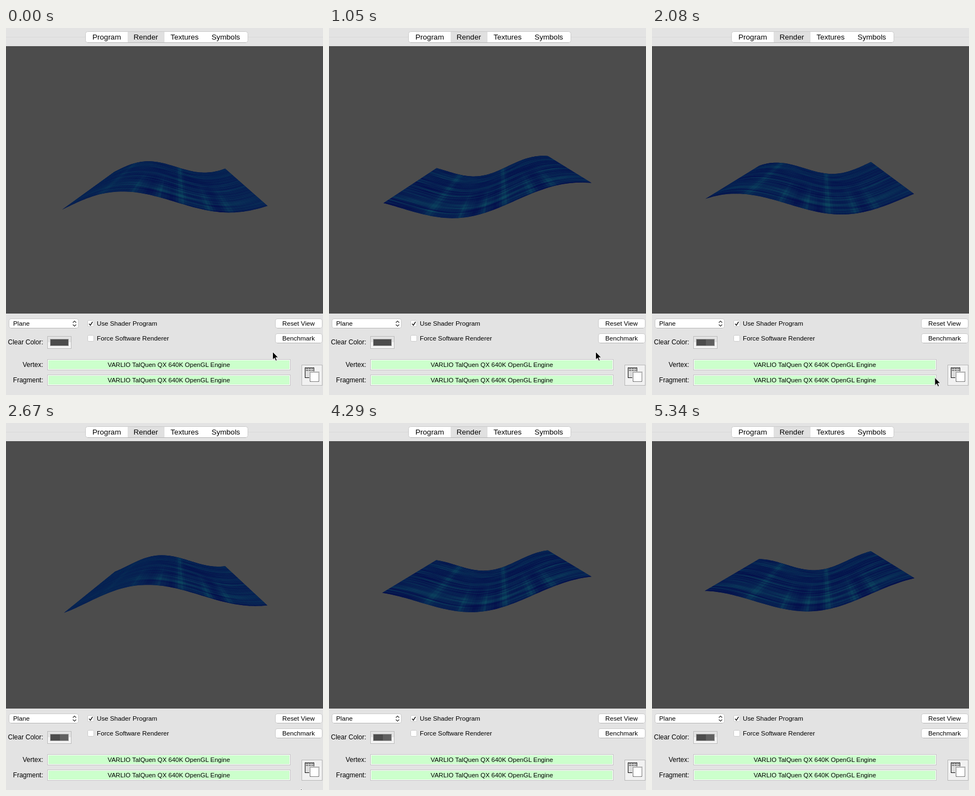
These frames come from a looping animation (576 px wide and 667 px high, 5.44 s). An HTML page with a canvas:

```html
<!DOCTYPE html>
<html lang="en">
<head>
<meta charset="utf-8">
<title>Shader preview</title>
<style>
  html, body { margin: 0; width: 576px; height: 667px; overflow: hidden; background: #e3e3e3; }
  svg, canvas { position: absolute; left: 0; top: 0; display: block; }
  text { font-family: "Liberation Sans", Arial, sans-serif; font-size: 11.7px; fill: #000; }
  .tab { font-size: 13.5px; text-anchor: middle; }
  .mid { text-anchor: middle; }
  .end { font-size: 12px; text-anchor: end; }
  .gpu { font-size: 11.5px; text-anchor: middle; }
  .btn { fill: #fff; stroke: #cbcbcb; }
  .edge { fill: none; stroke: #b6b6b6; }
</style>
</head>
<body>
<svg width="576" height="667" viewBox="0 0 576 667">
  <rect width="576" height="667" fill="#e3e3e3"/>
  <path d="M0 16.5H576" stroke="#dadada"/>
  <rect y="33" width="576" height="486" fill="#4c4c4c"/>

  <rect class="btn" x="144.5" y="6.5" width="295" height="20" rx="4"/>
  <rect x="221" y="7" width="67" height="19" fill="#e0e0e0"/>
  <path class="edge" d="M148 26.500H436"/>
  <text class="tab" x="183" y="21">Program</text>
  <text class="tab" x="254" y="21">Render</text>
  <text class="tab" x="324.5" y="21">Textures</text>
  <text class="tab" x="399.5" y="21">Symbols</text>

  <rect class="btn" x="5.5" y="528.5" width="126" height="17" rx="3.5"/>
  <path class="edge" d="M9 545.500H128"/>
  <text x="13" y="541">Plane</text>
  <path d="M121.500 535.500l3-3 3 3M121.500 539l3 3 3-3" fill="none" stroke="#333" stroke-width="1.200"/>

  <rect class="btn" x="148.5" y="531.5" width="11" height="11" rx="2"/>
  <path d="M151 537.500l2.300 2.700 4-6.200" fill="none" stroke="#222" stroke-width="1.500"/>
  <text x="165" y="541">Use Shader Program</text>
  <rect class="btn" x="148.5" y="558.5" width="11" height="11" rx="2"/>
  <text x="165" y="568">Force Software Renderer</text>

  <rect class="btn" x="489.5" y="528.5" width="85" height="17" rx="3.5"/>
  <text class="mid" x="531.5" y="541">Reset View</text>
  <rect class="btn" x="489.5" y="555.5" width="85" height="17" rx="3.5"/>
  <text class="mid" x="531.5" y="568">Benchmark</text>
  <path class="edge" d="M493 545.500H571M493 572.500H571"/>

  <text class="end" x="67.5" y="575">Clear Color:</text>
  <rect x="75.5" y="560.5" width="43" height="22" fill="#f4f4f4" stroke="#bcbcbc"/>
  <rect x="76" y="561" width="42" height="10" fill="#e3e3e3"/>
  <rect x="80.5" y="565.5" width="33" height="12" fill="#4c4c4c" stroke="#a0a0a0"/>
  <rect id="tint" x="98" y="566" width="15" height="11" fill="#606060"/>

  <text class="end" x="67.5" y="616">Vertex:</text>
  <text class="end" x="67.5" y="644">Fragment:</text>
  <g fill="none" stroke="#c4c4c4">
    <rect x="75.5" y="602.5" width="441" height="19"/>
    <rect x="75.5" y="630.5" width="441" height="19"/>
  </g>
  <g fill="#ccffcc" stroke="#fff">
    <rect x="76.5" y="603.5" width="439" height="17"/>
    <rect x="76.5" y="631.5" width="439" height="17"/>
  </g>
  <text class="gpu" x="296" y="616">VARLIO TalQuen QX 640K OpenGL Engine</text>
  <text class="gpu" x="296" y="644">VARLIO TalQuen QX 640K OpenGL Engine</text>

  <g shape-rendering="crispEdges">
    <rect x="537.5" y="612.5" width="37" height="37" fill="#f1f1f1" stroke="#b8b8b8"/>
    <rect x="543.5" y="617.5" width="16" height="18" fill="#dcdcdc" stroke="#111"/>
    <path d="M545 619.500h13M545 622.500h13" stroke="#333" stroke-dasharray="4 1"/>
    <rect x="551" y="624" width="19" height="20" fill="#e6e6e6"/>
    <rect x="552.5" y="625.5" width="16" height="17" fill="#fff" stroke="#111" stroke-dasharray="1 1" stroke-dashoffset=".5"/>
  </g>

  <path id="cursor" d="M0 0V16L3.700 12.600 6.200 18.300 8.700 17.200 6.300 11.600H11.300Z" fill="#000" stroke="#fff"/>
</svg>
<canvas id="view" width="576" height="519"></canvas>
<script>
const ctx = document.getElementById('view').getContext('2d');
const cursor = document.getElementById('cursor');
const tint = document.getElementById('tint');

// Step timing: 150 ms each, a few steps last 140 ms
const LOOP = 5440, STEPS = 37, SHORT = [9, 13, 15, 18, 20, 26];
const starts = [0];
for (let i = 0; i < STEPS - 1; i++) starts.push(starts[i] + (SHORT.includes(i) ? 140 : 150));

// Resting plane corners: front left, front right, back right, back left
const [A, B, C, D] = [[101.5, 329], [476, 306], [398, 246], [196.7, 260.8]];
const VANISH = [420, 1650], LIFT = -0.0182, K = 5.6;
const ROWS = 60, COLS = 72;

const d1 = [B[0] - C[0], B[1] - C[1]];
const d2 = [D[0] - C[0], D[1] - C[1]];
const sum = [0, 1].map(n => A[n] - B[n] + C[n] - D[n]);
const den = d1[0] * d2[1] - d2[0] * d1[1];
const G = (sum[0] * d2[1] - d2[0] * sum[1]) / den;
const H = (d1[0] * sum[1] - sum[0] * d1[1]) / den;

function project(u, v, phase) {
  const lift = LIFT * Math.cos(K * u - phase);
  const w = 1 + G * u + H * v + lift;
  return [0, 1].map(n =>
    (A[n] + u * (B[n] * (1 + G) - A[n]) + v * (D[n] * (1 + H) - A[n]) + lift * VANISH[n]) / w);
}

const clamp = (x, lo, hi) => Math.max(lo, Math.min(hi, x));

function rnd(a, b) {
  const s = Math.sin(a * 127.1 + b * 311.7) * 43758.5453;
  return s - Math.floor(s);
}

function noise(x, row) {
  const i = Math.floor(x), f = x - i;
  return rnd(i, row) * (1 - f) + rnd(i + 1, row) * f;
}

const bump = (u, at, width) => Math.exp(-(((u - at) / width) ** 2));

// Grain of the water: -1 is dark, +1 is teal
function grain(u, v, row) {
  const front = clamp(1.1 - 2 * v, 0, 1);
  const thread = noise(u * 9, row) * 1.1 + rnd(row, 77) * 1.1 - 1.35;
  const streaks = 0.6 * bump(u, 0.21, 0.022) + 0.75 * bump(u, 0.6, 0.018) +
    front * (0.7 * bump(u, 0.37, 0.015) + 0.65 * bump(u, 0.49, 0.012) +
      0.8 * bump(u, 0.73, 0.018) + 0.7 * bump(u, 0.83, 0.018) -
      0.5 * bump(u, 0.44, 0.02) - 0.5 * bump(u, 0.55, 0.018) - 0.5 * bump(u, 0.78, 0.02));
  return thread + streaks;
}

const DARK = [6, 16, 76], BASE = [9, 39, 84], TEAL = [13, 72, 96];

function shade(n) {
  const to = n < 0 ? DARK : TEAL, k = Math.min(1, Math.abs(n));
  return `rgb(${BASE.map((c, i) => Math.round(c + (to[i] - c) * k))})`;
}

function trace(points) {
  ctx.beginPath();
  points.forEach(p => ctx.lineTo(p[0], p[1]));
  ctx.closePath();
}

function drawSurface(phase) {
  const at = (r, c) => project(c / COLS, r / ROWS, phase);
  const grid = [];
  for (let r = 0; r <= ROWS; r++) {
    grid.push([]);
    for (let c = 0; c <= COLS; c++) grid[r].push(at(r, c));
  }
  ctx.clearRect(0, 0, 576, 519);
  ctx.save();
  trace([...grid[0], ...grid[ROWS].slice().reverse()]);
  ctx.fillStyle = shade(0);
  ctx.fill();
  ctx.clip();
  ctx.lineWidth = 0.4;
  // The grain fades as the wave crest reaches the middle
  const calm = clamp(phase / 2, 0, 1);
  for (let r = ROWS - 1; r >= 0; r--) {
    for (let c = 0; c < COLS; c++) {
      const u = (c + 0.5) / COLS, v = (r + 0.5) / ROWS;
      const rise = -Math.sin(K * u - phase);
      const force = clamp(1 - calm * (0.4 + 0.4 * rise), 0.25, 1);
      trace([grid[r][c], grid[r][c + 1], grid[r + 1][c + 1], grid[r + 1][c]]);
      ctx.fillStyle = ctx.strokeStyle = shade(grain(u, v, r) * force);
      ctx.fill();
      ctx.stroke();
    }
  }
  ctx.restore();
}

function moveCursor(step) {
  const back = clamp((step - 8) / 3, 0, 1);
  const away = clamp((step - 11) / 5, 0, 1);
  const x = 484.5 - 3 * back + 54 * away;
  const y = 588.5 + 3 * back + 73 * away;
  cursor.setAttribute('transform', `translate(${x} ${y}) scale(.9)`);
  cursor.style.display = step > 18 ? 'none' : '';
}

let shown = -1;

function tick() {
  const now = performance.now() % LOOP;
  let step = STEPS - 1;
  while (starts[step] > now) step--;
  if (step !== shown) {
    shown = step;
    const t = starts[step] / 1000;
    drawSurface(0.697 + 1.856 * Math.cos(1.765 * (t - 2.965)));
    moveCursor(step);
    tint.style.display = step < 8 ? 'none' : '';
  }
  requestAnimationFrame(tick);
}
tick();
</script>
</body>
</html>
```
